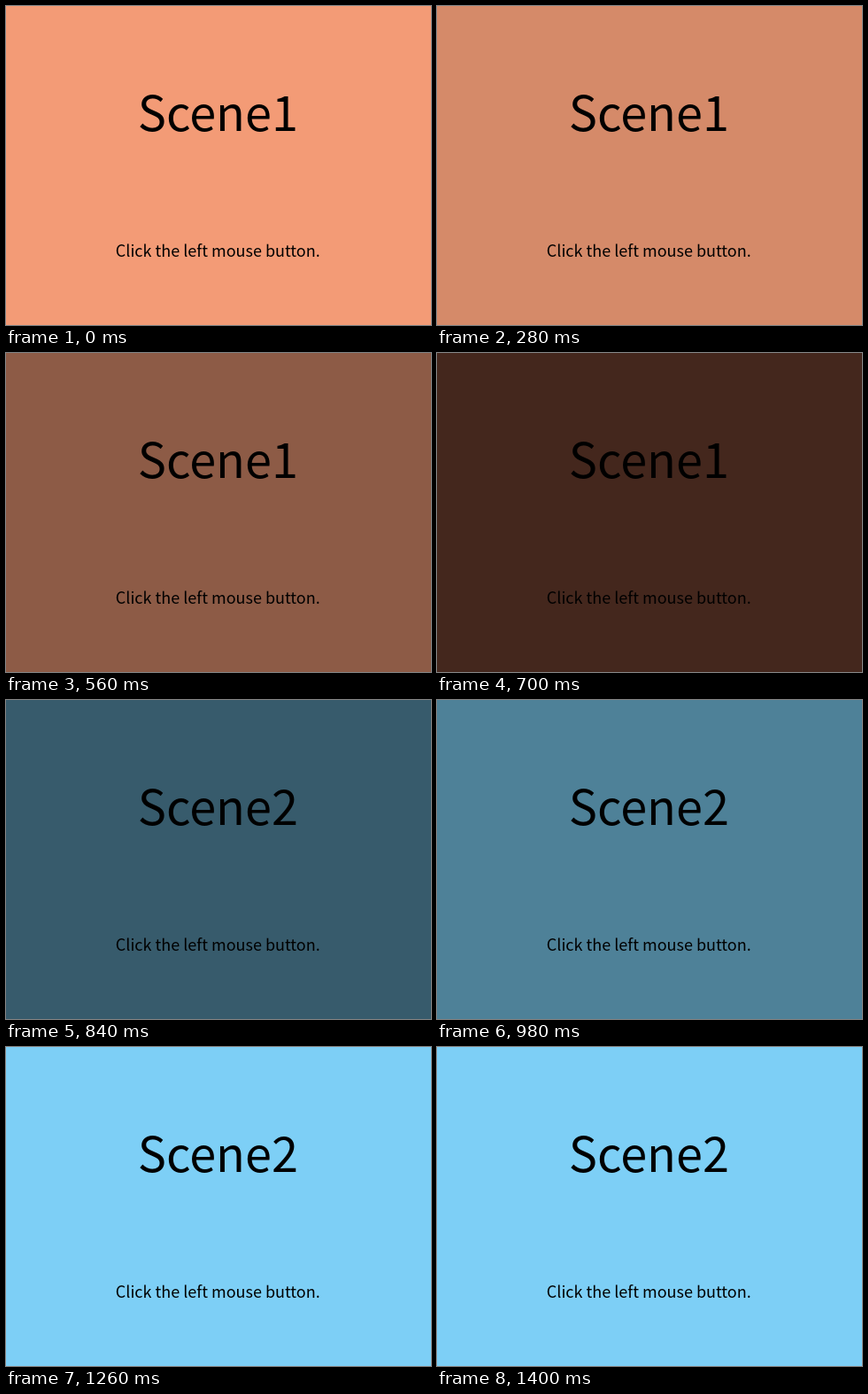
Write an HTML page that moves like this. It is 480 px wide and 360 px high and loops after 2520 ms.

```html
<!DOCTYPE html>
<html lang="en">
<head>
<meta charset="utf-8">
<title>Scene fade</title>
<style>
  html, body { margin: 0; width: 100%; height: 100%; overflow: hidden; }
  svg { display: block; width: 100vw; height: 100vh; background: #f39b76; }
  text { font-family: "Noto Sans CJK JP", "Noto Sans CJK", sans-serif; text-anchor: middle; fill: #000; }
  .title { font-size: 54px; }
  .hint { font-size: 18px; }
</style>
</head>
<body>
<svg id="stage" viewBox="0 0 480 360">
  <text id="first" class="title" x="239.3" y="141">Scene1</text>
  <text id="second" class="title" x="239.3" y="141" opacity="0">Scene2</text>
  <text class="hint" x="239.3" y="283">Click the left mouse button.</text>
</svg>
<script>
  const LOOP = 2520;
  const SWAP = 840;
  // [start in ms, background]: fade out scene 1, then fade in scene 2
  const fade = [
    [0, '#f39b76'],
    [280, '#d58a69'],
    [420, '#b17257'],
    [560, '#8d5b46'],
    [700, '#44271d'],
    [SWAP, '#375b6c'],
    [980, '#4e8198'],
    [1120, '#66a7c5'],
    [1260, '#7dcff6'],
  ];

  function play(id, property, steps) {
    const last = steps[steps.length - 1][1];
    const frames = [...steps, [LOOP, last]].map(([time, value]) => ({
      offset: time / LOOP, [property]: value, easing: 'step-end',
    }));
    document.getElementById(id).animate(frames, { duration: LOOP, iterations: Infinity });
  }

  play('stage', 'backgroundColor', fade);
  play('first', 'opacity', [[0, 1], [SWAP, 0]]);
  play('second', 'opacity', [[0, 0], [SWAP, 1]]);
</script>
</body>
</html>
```
